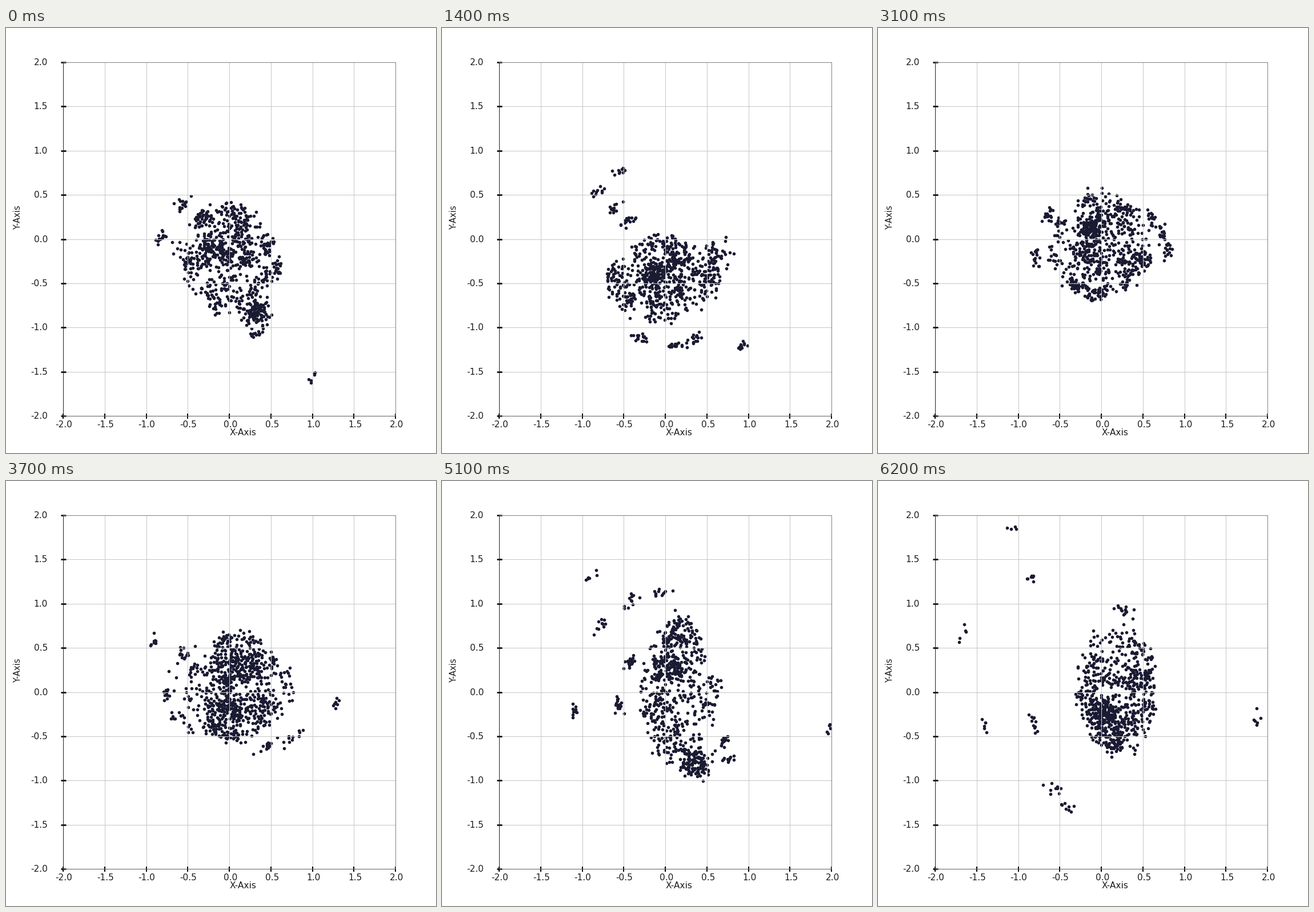
A matplotlib script that plays this animation: 753 px wide and 744 px high, repeating every 6.3 s.

```python
import numpy as np
import matplotlib.pyplot as plt
from matplotlib.animation import FuncAnimation

W, H, N = 753, 744, 820
STEP, LOOP = 100, 6300
LEFT, RIGHT, TOP, BOTTOM = 100, 682, 60, 679
rng = np.random.default_rng(12)


# Points are complex numbers: x + y*1j in axis units.
def trail(spot, middle, n, along, across):
    """A soft streak lying across the line from the middle to the spot."""
    turn = 1j * np.exp(1j * np.angle(spot - middle))
    return spot + turn * (along * rng.normal(size=n) + 1j * across * rng.normal(size=n))


def disc(n):
    return np.sqrt(rng.random(n)) * np.exp(2j * np.pi * rng.random(n))


def cloud(middle, rx, ry, cores, satellites):
    """Dense cores and thin satellites; a clumpy ellipse takes the rest."""
    parts = [trail(c, middle, 110 // (k + 1), 0.09, 0.08) for k, c in enumerate(cores)]
    for s in satellites:
        far = abs(s - middle)
        parts.append(trail(s, middle, int(26 / (1 + far ** 2)), 0.055, 0.025))
    rest = N - sum(map(len, parts))

    def fit(p):
        return middle + rx * p.real + 1j * ry * p.imag

    for spot in fit(disc(rest // 18)):
        parts.append(trail(spot, middle, 9, 0.06, 0.035))
    loose = N - sum(map(len, parts))
    parts.append(fit(disc(loose) * rng.normal(1, 0.08, loose)))
    return np.concatenate(parts)


def match(a, b, rounds=4000):
    """Reorder b by pairwise swaps so that every point travels a short way."""
    b = b.copy()
    for _ in range(rounds):
        i, j = rng.permutation(N).reshape(2, -1)
        swap = ((a[i] - a[j]) * (b[i] - b[j]).conj()).real < 0
        i, j = i[swap], j[swap]
        b[i], b[j] = b[j], b[i]
    return b


# Time in ms, then middle, radii, cores and satellites of the swarm.
stages = {
    0: cloud(-0.05 - 0.2j, 0.57, 0.6, [0.32 - 0.82j, -0.04 - 0.16j],
             [0.98 - 1.55j, -0.56 + 0.4j, -0.83 + 0.02j, 0.33 - 1.06j, 0.58 - 0.32j]),
    1400: cloud(-0.02 - 0.43j, 0.66, 0.47, [-0.15 - 0.4j, 0.12 - 0.28j, 0.62 - 0.16j],
                [-0.62 + 0.35j, -0.45 + 0.2j, -0.8 + 0.54j, -0.56 + 0.78j,
                 0.94 - 1.19j, 0.12 - 1.2j, 0.36 - 1.12j, -0.28 - 1.12j]),
    2100: cloud(0.02 - 0.3j, 0.65, 0.58, [-0.15 - 0.32j, 0.22 + 0.05j, -0.2 - 0.55j],
                [-0.6 + 0.38j, -0.45 + 0.25j, -0.76 - 0.1j, -0.1 + 0.35j,
                 0.14 - 1.24j, 0.58 - 0.92j]),
    3100: cloud(-0.02 - 0.05j, 0.6, 0.6, [-0.12 + 0.12j, -0.15 - 0.17j, 0.4 - 0.25j],
                [-0.65 + 0.27j, 0.8 - 0.14j, 0.72 + 0.1j, 0.6 + 0.24j,
                 -0.78 - 0.2j, -0.1 - 0.65j]),
    4200: cloud(0.15 + 0.1j, 0.58, 0.58, [0.08 - 0.16j, 0.32 + 0.35j],
                [-1.11 + 0.84j, 1.65 - 0.14j, 0.31 + 0.77j, 0.07 + 0.75j, 0.9 - 0.68j,
                 0.6 - 0.68j, -0.72 + 0.14j, -0.55 + 0.58j, -0.55 - 0.3j]),
    5100: cloud(0.15 + 0.02j, 0.45, 0.82, [0.35 - 0.82j, 0.1 + 0.28j],
                [-0.06 + 1.15j, -0.42 + 1.02j, -0.78 + 0.76j, -0.9 + 1.31j, -1.08 - 0.2j,
                 1.98 - 0.39j, -0.57 - 0.12j, -0.42 + 0.34j, 0.7 - 0.58j, 0.75 - 0.77j]),
    6200: cloud(0.2 + 0.06j, 0.47, 0.74, [0.05 - 0.25j, 0.16 - 0.47j, 0.5 + 0.13j],
                [-1.05 + 1.84j, -0.86 + 1.28j, -1.66 + 0.69j, -1.4 - 0.37j, -0.82 - 0.37j,
                 -0.55 - 1.09j, -0.43 - 1.29j, 1.87 - 0.3j, 0.27 + 0.93j]),
}


def clock(ms):
    """The swarm rests for 200 ms after 2400 ms."""
    return ms - np.clip(ms - 2400, 0, 200)


times = [clock(ms) for ms in stages]
poses = []
for pose in stages.values():
    poses.append(match(poses[-1], pose) if poses else pose)


def positions(ms):
    t = clock(ms)
    k = min(np.searchsorted(times, t, side="right") - 1, len(times) - 2)
    f = (t - times[k]) / (times[k + 1] - times[k])
    p = poses[k] * (1 - f) + poses[k + 1] * f
    return p[(abs(p.real) <= 2) & (abs(p.imag) <= 2)]


def snap(v, length):
    """Place a coordinate on whole pixels."""
    return np.round(v * length / 4) * 4 / length


fig = plt.figure(figsize=(W / 72, H / 72), dpi=72, facecolor="white")
ax = fig.add_axes([LEFT / W, 1 - BOTTOM / H, (RIGHT - LEFT) / W, (BOTTOM - TOP) / H])
ticks = np.arange(-2, 2.1, 0.5)
ax.set(xlim=(-2, 2), ylim=(-2, 2), xticks=ticks, yticks=ticks)
ax.set_axisbelow(False)
ax.grid(color="#c6c6c6", linewidth=1)
ax.tick_params(direction="inout", length=9, labelbottom=False, labelleft=False)
ax.tick_params(axis="x", width=2)
ax.tick_params(axis="y", width=2.6)
for side, color in dict(top="#808080", right="#808080", bottom="#606060", left="#202020").items():
    ax.spines[side].set(color=color, linewidth=1, zorder=3)


def label(x, y, s, size=15.4, **kw):
    fig.text(x / W, 1 - y / H, s, fontsize=size, family="DejaVu Sans",
             color="#1a1a1a", va="baseline", **kw)


for k, v in enumerate(ticks):
    x = LEFT + k * (RIGHT - LEFT) / 8
    y = BOTTOM - k * (BOTTOM - TOP) / 8
    label(x + (2 if v >= 0 else 1), 699, f"{v:.1f}", ha="center")
    label(73, y + 5, f"{v:.1f}", ha="right")
label(415, 713, "X-Axis", ha="center")
label(25, 332, "Y-Axis", 14.6, rotation=90, rotation_mode="anchor", ha="center")

dots, = ax.plot([], [], "o", color="#1a1a32", markersize=5.6, markeredgewidth=0,
                clip_on=False, zorder=1.2)


def draw(frame):
    p = positions(frame * STEP)
    dots.set_data(snap(p.real, RIGHT - LEFT), snap(p.imag, BOTTOM - TOP))
    return dots,


anim = FuncAnimation(fig, draw, frames=LOOP // STEP, interval=STEP,
                     init_func=lambda: draw(0), repeat=True, repeat_delay=0)
plt.show()
```
